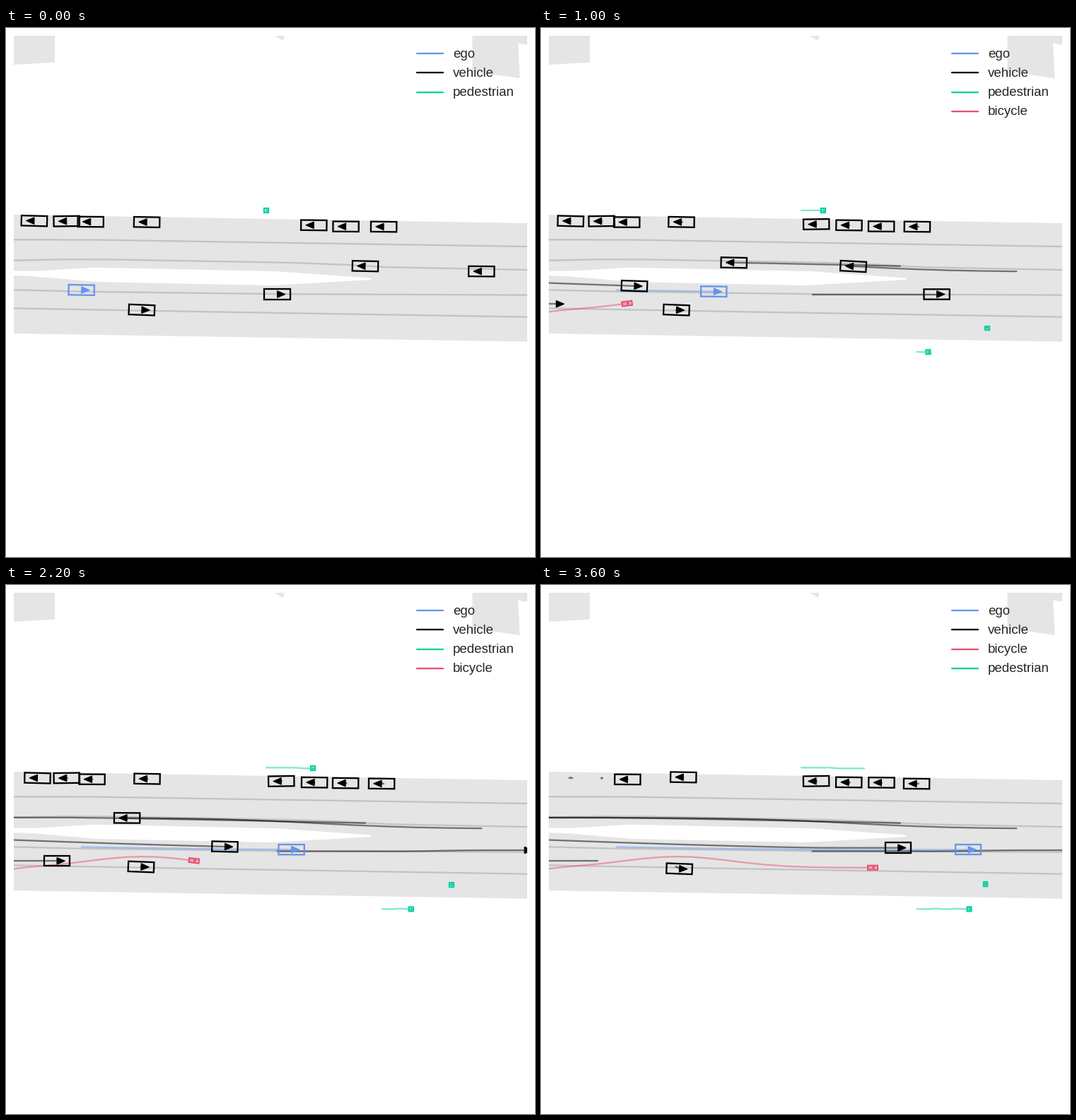
A matplotlib script that plays this animation: 748 px wide and 748 px high, repeating every 3.8 s.

```python
import numpy as np
import matplotlib.pyplot as plt
from matplotlib.animation import FuncAnimation

plt.rcParams["font.family"] = "Liberation Sans"

FRAMES, STEP = 19, 200
LO, HI = 11, 737
LW = 1.5
ROAD, LANE = "#e5e5e5", "#c3c3c3"
COLORS = {"ego": "#6495ed", "vehicle": "black",
          "pedestrian": "#06d0a0", "bicycle": "#ea4f70"}
# length, width, arrow length, arrow half height
CAR = (36.3, 14.3, 11.4, 4.8)
SIZES = {"ego": CAR, "vehicle": CAR,
         "pedestrian": (5.9, 5.9, 1.9, 1.5), "bicycle": (13.8, 5.8, 4, 1.6)}

rng = np.random.default_rng(4)
steps = np.arange(FRAMES)

fig = plt.figure(figsize=(6.8, 6.8), dpi=110, facecolor="white")
ax = fig.add_axes([LO / 748, LO / 748, (HI - LO) / 748, (HI - LO) / 748])
ax.set_xlim(LO, HI)
ax.set_ylim(HI, LO)
ax.axis("off")


def area(points, color=ROAD):
    ax.fill(*zip(*points), color=color, lw=0, zorder=1)


def lane(*points):
    ax.plot(*zip(*points), color=LANE, lw=LW, zorder=2)


def draw_map():
    area([(11, 11), (69, 11), (69, 48.5), (11, 52)])
    area([(380, 11), (393.5, 11), (392, 18)])
    area([(659.5, 11), (737, 11), (737, 24), (724, 21.5), (726.5, 71), (659.5, 61.5)])
    area([(11, 264), (737, 276), (737, 443.5), (11, 432)])
    area([(11, 343.5), (45, 343.5), (125, 338.7), (380, 344), (516, 353.5),
          (516, 356), (375, 364), (130, 359), (40, 351.3), (11, 350)], "white")
    lane((11, 299.3), (130, 299.6), (300, 302.3), (737, 309))
    lane((11, 328.6), (80, 327.3), (150, 327.4), (400, 331.8),
         (480, 334.7), (540, 338.2), (737, 342))
    lane((11, 370.3), (106, 372.7), (380, 376.1), (737, 377.6))
    lane((11, 396.3), (300, 401.5), (737, 408.6))


def ease(t):
    t = np.clip(t, 0, 1)
    return t * t * (3 - 2 * t)


class Track:
    """One road user: where it is and how it is turned at every step."""

    def __init__(self, kind, x, y, angle, first=0, last=FRAMES - 1):
        self.kind, self.first, self.last = kind, first, last
        self.pos = np.column_stack([x, y])
        self.angle = np.radians(angle) + np.zeros(FRAMES)

    def alive(self, k):
        return self.first <= k <= self.last

    def inside(self, k):
        return self.alive(k) and LO <= self.pos[k, 0] <= HI

    def trail(self, k):
        return self.pos[self.first:min(k, self.last) + 1].T

    def shape(self, k, points):
        c, s = np.cos(self.angle[k]), np.sin(self.angle[k])
        return np.array(points) @ [[c, s], [-s, c]] + self.pos[k]


def mover(kind, path, *stops):
    """Steady pace between (step, x) stops along the curve y = path(x)."""
    keys, xs = zip(*stops)
    x = np.interp(steps, keys, xs)
    way = np.sign(xs[-1] - xs[0])
    slope = path(x + way) - path(x)
    return Track(kind, x, path(x), np.degrees(np.arctan2(slope, way)), keys[0], keys[-1])


def parked(x, y, tilt, creep=(0, 0), power=1, **life):
    """Standing car with sensor jitter and a slow creep."""
    drift = (steps / (FRAMES - 1)) ** power
    jitter = rng.normal(0, 1, (2, FRAMES))
    return Track("vehicle", x + creep[0] * drift + 0.4 * jitter[0],
                 y + creep[1] * drift + 0.1 * jitter[1], tilt, **life)


def ego_path(x):
    return 374.3 - 4 * np.clip(1 - (x - 100) / 350, 0, 1) ** 1.6


def oncoming_path(x):
    return 328.8 + 0.00557 * np.clip(x - 85, 0, None) ** 1.2


def merging_path(x):
    return 329 + 15.8 / (1 + np.exp((440 - x) / 75))


def leader_path(x):
    return 376.5 - 1.5 * ease((x - 560) / 115)


def follower_path(x):
    return 371.6 - 11.5 * np.clip(1 - x / 400, 0, None) ** 1.3


def bike_path(x):
    return 399.7 - 15.7 * np.exp(-((x - 193) / 108) ** 2) + 4 * np.exp(-x / 20)


def walk_path(x):
    return 258.3 + ease((x - 408) / 14)


sway = np.sin((steps - 3) * np.pi / 9)

tracks = [
    mover("ego", ego_path, (0, 106.7), (5, 244.3), (9, 349.7), (13, 457.5), (18, 604)),
    parked(40.2, 272.8, 181.5, creep=(6, 0.3), last=12),
    parked(86, 273, 179.2, last=15),
    parked(120, 274, 180.4, creep=(1.9, 0.9), power=0.3),
    parked(199.2, 274.4, 181, creep=(2, -2.5), power=4),
    parked(389.3, 277.3, 179.1, first=1),
    parked(435.8, 279, 180.7),
    parked(480.6, 280.7, 180.5, creep=(0.4, -1.2)),
    parked(533, 280.9, 180.6, creep=(-2, 0), power=0.5),
    parked(191.4, 398.6, 2.2, creep=(4.5, 2.5), power=15),
    mover("vehicle", oncoming_path, (0, 508), (3, 362), (11, 5)),
    mover("vehicle", merging_path, (0, 672.3), (9, 257), (13, 85.2), (15, -8)),
    mover("vehicle", leader_path, (0, 383.5), (5, 559.6), (9, 675.3), (12, 762)),
    mover("vehicle", follower_path, (0, -27), (5, 132), (9, 253.6), (13, 365.3), (18, 504.7)),
    mover("vehicle", lambda x: 390.2 + 0 * x, (0, -32), (5, 21.4), (9, 57), (12, 79.5)),
    mover("pedestrian", walk_path, (0, 368), (5, 399), (15, 457)),
    mover("bicycle", bike_path, (0, 5), (5, 121.7), (9, 214.7), (13, 317), (18, 469)),
    mover("pedestrian", lambda x: 458 + 0.3 * np.sin(x / 5), (1, 531.5), (9, 563.5), (18, 605.5)),
    Track("pedestrian", 629.9 + 1.6 * sway, 424 + 0.8 * sway, -90, first=1),
]

live = []


def draw_track(track, k):
    color = COLORS[track.kind]
    if k >= track.first:
        live.extend(ax.plot(*track.trail(k), color=color, alpha=0.5, lw=LW, zorder=3,
                            solid_capstyle="round", solid_joinstyle="round"))
    if not track.alive(k):
        return
    length, width, tip, half = SIZES[track.kind]
    l, w = length / 2, width / 2
    box = track.shape(k, [(-l, -w), (l, -w), (l, w), (-l, w)])
    if box.min() >= LO and box.max() <= HI:
        live.extend(ax.fill(*box.T, fill=False, ec=color, lw=LW, zorder=5))
    arrow = track.shape(k, [(0, -half), (tip, 0), (0, half)])
    live.extend(ax.fill(*arrow.T, color=color, lw=0.7, zorder=5))


def draw_legend(kinds):
    for i, kind in enumerate(kinds):
        y = 36.1 + 27.2 * i
        live.extend(ax.plot([581.2, 617.8], [y, y], color=COLORS[kind], lw=LW,
                            solid_capstyle="round", zorder=9))
        live.append(ax.text(632.2, y + 5.7, kind, fontsize=12.2, color="0.15", zorder=9))


def update(k):
    while live:
        live.pop().remove()
    for track in tracks:
        draw_track(track, k)
    draw_legend(dict.fromkeys(t.kind for t in tracks if t.inside(k)))
    return live


draw_map()
anim = FuncAnimation(fig, update, frames=FRAMES, interval=STEP,
                     repeat=True, repeat_delay=0, blit=False)
plt.show()
```
